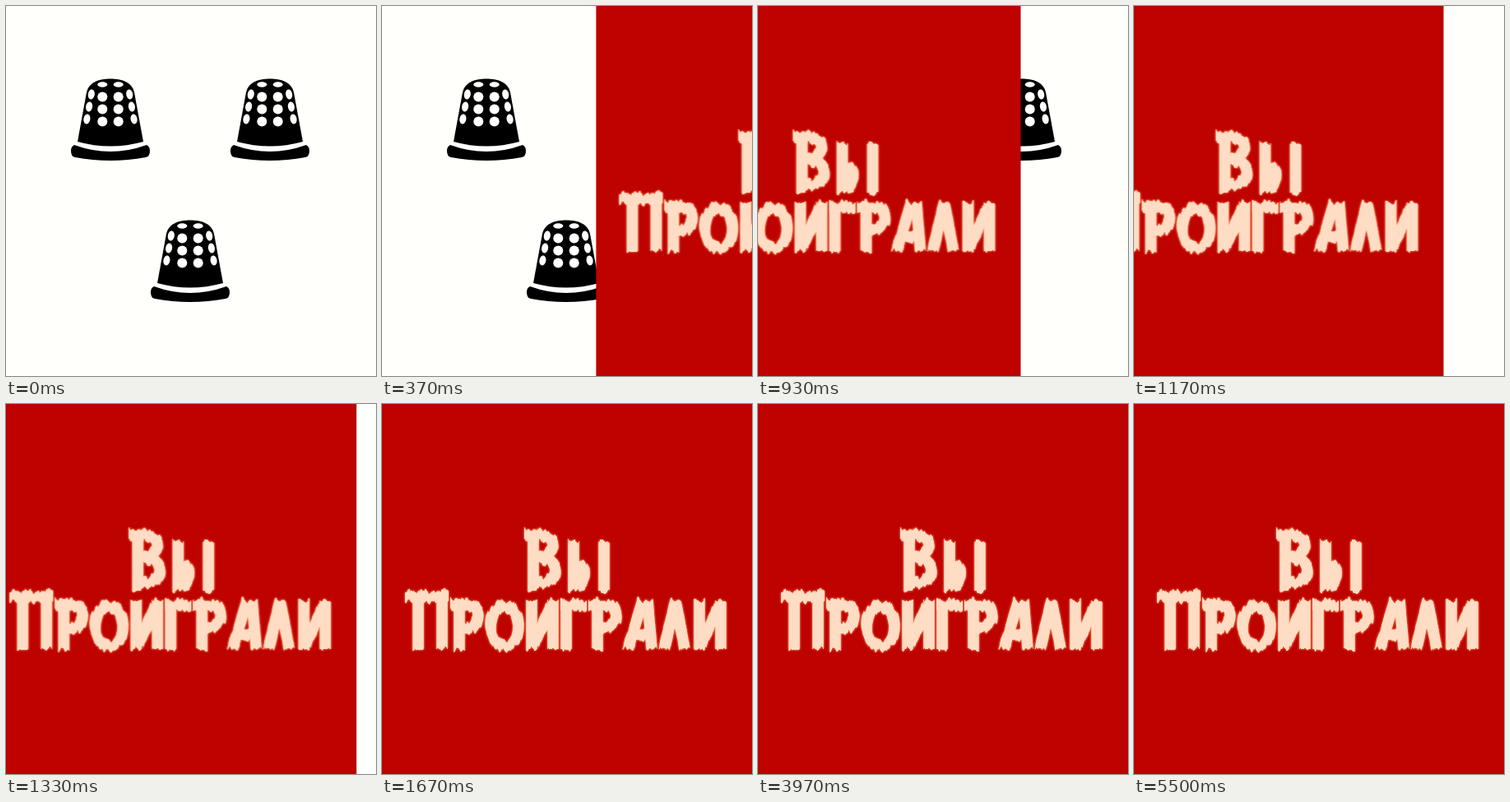
An HTML page that plays this animation: 450 by 450 pixels, repeating every 6010 ms.

```html
<!DOCTYPE html>
<html lang="ru">
<head>
<meta charset="utf-8">
<title>Вы проиграли</title>
<style>
  html, body { margin: 0; width: 100%; height: 100%; overflow: hidden; background: #fffffb; }
  svg { display: block; width: 100vw; height: 100vh; }
  #words { filter: url(#torn) drop-shadow(0 0 1px #f4704a) drop-shadow(0 0 1px #ea5a34); }
</style>
</head>
<body>
<svg viewBox="0 0 450 450">
  <defs>
    <!-- Fine vertical tears, as left by a dry brush -->
    <filter id="torn" color-interpolation-filters="sRGB">
      <feTurbulence type="fractalNoise" baseFrequency=".2 .02" numOctaves="2" seed="4"/>
      <feColorMatrix values="0 0 0 0 .5  0 1 0 0 0  0 0 1 0 0  0 0 0 0 1" result="noise"/>
      <feDisplacementMap in="SourceGraphic" in2="noise" scale="12" xChannelSelector="R" yChannelSelector="G"/>
    </filter>
    <g id="thimble">
      <path d="M-40 77L-29 17C-26 4-13 .5 0 .5S26 4 29 17L40 77Q0 88-40 77Z"/>
      <path d="M-44 81Q0 97 44 81Q48 83 48 88Q48 95 43 96Q0 104-43 96Q-48 95-48 88Q-48 83-44 81Z"/>
      <g id="dots" fill="#fffffb"></g>
    </g>
  </defs>
  <use href="#thimble" x="127" y="88"/>
  <use href="#thimble" x="321" y="88"/>
  <use href="#thimble" x="224" y="260"/>
  <g id="panel" role="img" aria-label="Вы проиграли">
    <path fill="#bd0200" d="M0 0H450V450H0Z"/>
    <g id="words" fill="none" stroke="#ffdcc4" stroke-width="13.5"></g>
  </g>
</svg>
<script>
const $ = id => document.getElementById(id);

function dot(x, y, rx, ry, lean = 0) {
  return `<ellipse rx="${rx}" ry="${ry}" transform="translate(${x} ${y}) rotate(${lean})"/>`;
}

// Rows of dimples; the outer ones are narrow and lean with the sides.
for (let row = 0; row < 4; row++) {
  const y = 7.5 + 15 * row;
  for (const side of [-1, 1]) {
    $('dots').innerHTML += dot(side * 9.7, y, 6, row ? 6 : 3.3);
    if (row) $('dots').innerHTML += dot(side * (20.5 + 2.7 * row), y - 3, 4, 6, -10 * side);
  }
}

// Letter widths and brush strokes; small capitals stand between y = 0 and 60.
const glyphs = {
  В: [50, 'M11-13V60M0-8H12M6-7C26-10 35-4 35 4C35 14 24 20 12 20C30 19 38 26 38 36C38 48 26 53 8 53'],
  ы: [51, 'M8 0V60M8 30C20 28 22 35 21 42C19 53 14 53 8 53M45 0V60'],
  П: [53, 'M16-11V60M45-11V59M0-5H53'],
  р: [40, 'M11 0V60M0 5H12M8 6C27 3 34 8 34 18C34 30 25 35 12 35'],
  о: [47, 'M24 7a17 24 0 0 1 0 48a17 24 0 0 1 0-48'],
  и: [40, 'M8 0V59M34 0V59M10 54L32 6'],
  г: [33, 'M8 0V60M1 6H33'],
  а: [43, 'M6 59L24 0M30 0L35 59M10 42H34'],
  л: [38, 'M5 59L19 0M19 0L30 59']
};

function write(word, x, y) {
  for (const letter of word) {
    const [width, strokes] = glyphs[letter];
    $('words').innerHTML += `<path d="${strokes}" transform="translate(${x} ${y})"/>`;
    x += width + 2;
  }
}
write('Вы', 173, 167);
write('Проиграли', 28, 239);

// The panel flies in from the right, overshoots and settles.
const LOOP = 6010, START = 8.27, LENGTH = 36.8, BACK = 3.38;

function slide(tick) {
  const p = Math.min(1, Math.max(0, (tick - START) / LENGTH));
  const u = 1 - p;
  return 450 * ((BACK + 1) * u ** 3 - BACK * u ** 2);
}

function draw() {
  const tick = Math.floor((performance.now() % LOOP + 4) * .03); // 30 steps a second
  $('panel').setAttribute('transform', `translate(${slide(tick).toFixed(1)} 0)`);
  requestAnimationFrame(draw);
}
draw();
</script>
</body>
</html>
```
